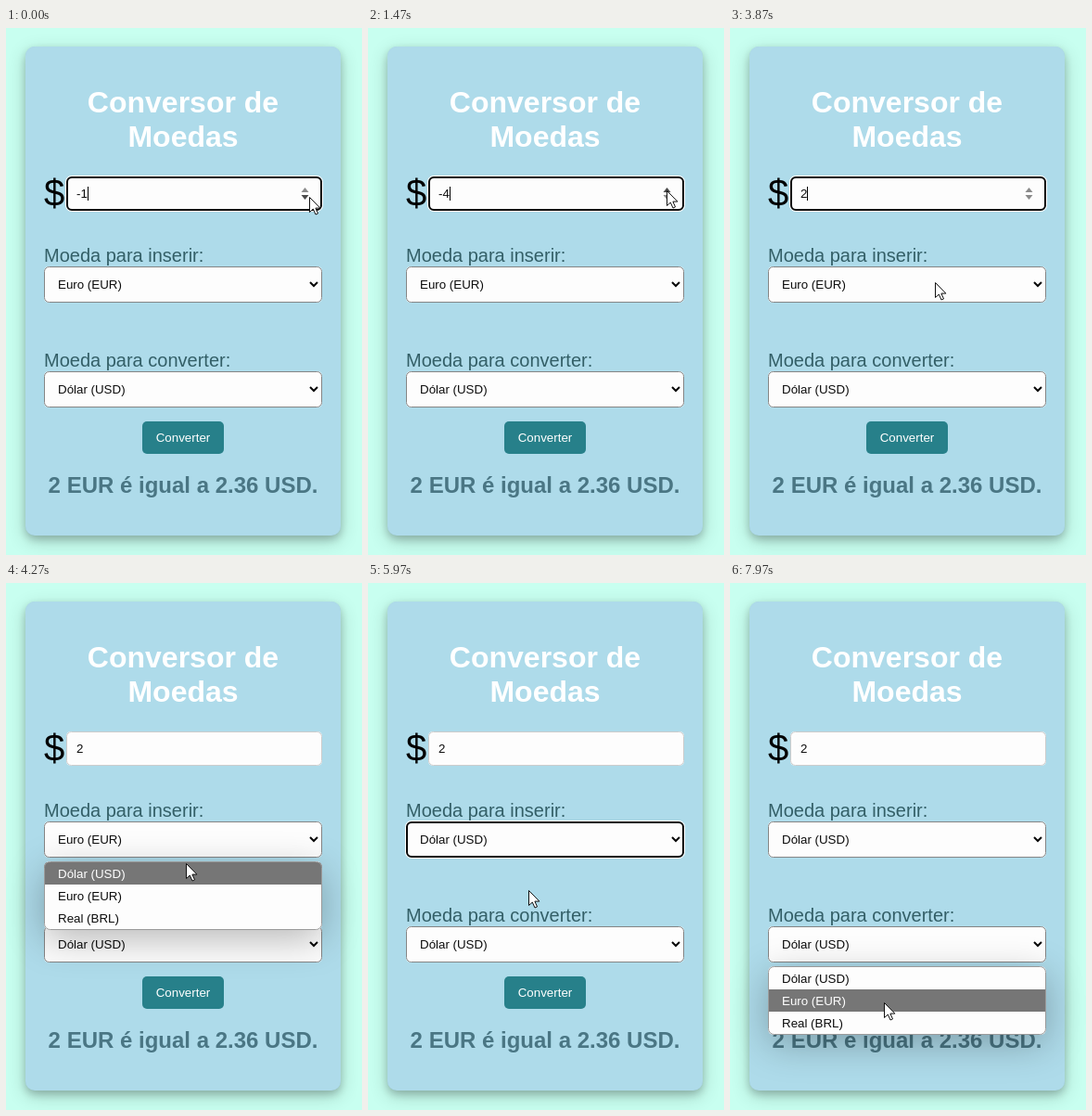
Write an HTML page with a canvas that moves like this. It is 384 by 568 pixels and loops after 8000 ms.

```html
<!DOCTYPE html>
<html lang="pt">
<head>
<meta charset="utf-8">
<title>Conversor de Moedas</title>
<style>
html, body { margin: 0; width: 100%; height: 100%; overflow: hidden; background: #c8fff0; }
canvas { display: block; width: 384px; height: 568px; }
</style>
</head>
<body>
<canvas id="stage"></canvas>
<script>
const W = 384, H = 568, LOOP = 8000;
const FONT = '"Liberation Sans", Arial, sans-serif';
const PAGE = '#c8fff0', CARD = '#aedbea', PAPER = '#fdfdfd', INK = '#0c0c0c', LABEL = '#335f67';
const OPTIONS = ['Dólar (USD)', 'Euro (EUR)', 'Real (BRL)'];
const ROW = 24, FIRST_Y = 257, SECOND_Y = 370, MENU_DROP = 43;

// Times of the clicks
const CLICK_GAP = 240, FIRST_UP = 1400;
const OPEN_FIRST = 4050, PICK_FIRST = 5500, OPEN_SECOND = 6450;

// Resting points of the pointer
const STOPS = [
  { t: 1000, x: 327, y: 182 },
  { t: 1300, x: 322, y: 175 },
  { t: 2900, x: 322, y: 175 },
  { t: 3870, x: 221, y: 274 },
  { t: 4930, x: 177, y: 320 },
  { t: 5970, x: 173, y: 331 },
  { t: 7030, x: 177, y: 395 },
  { t: 7970, x: 166, y: 452 }
];

const canvas = document.getElementById('stage');
const ctx = canvas.getContext('2d');
const dpr = window.devicePixelRatio || 1;
canvas.width = W * dpr;
canvas.height = H * dpr;
ctx.scale(dpr, dpr);

const clamp = (v, lo, hi) => Math.min(hi, Math.max(lo, v));
const easeOut = p => p * (2 - p);

function pointerAt(t) {
  const next = STOPS.findIndex(s => s.t > t);
  if (next === 0) return STOPS[0];
  if (next < 0) return STOPS[STOPS.length - 1];
  const a = STOPS[next - 1], b = STOPS[next];
  const k = easeOut((t - a.t) / (b.t - a.t));
  return { x: Math.round(a.x + (b.x - a.x) * k), y: Math.round(a.y + (b.y - a.y) * k) };
}

// Four clicks down from -1, then seven up to 2
function counterAt(t) {
  const downs = clamp(Math.floor(t / CLICK_GAP), 0, 4);
  const ups = clamp(Math.floor((t - FIRST_UP) / CLICK_GAP) + 1, 0, 7);
  const since = ups ? FIRST_UP + (ups - 1) * CLICK_GAP : downs * CLICK_GAP;
  return { value: ups - downs - 1, since };
}

function fillBox(x, y, w, h, r, color) {
  ctx.beginPath();
  ctx.roundRect(x, y, w, h, r);
  ctx.fillStyle = color;
  ctx.fill();
}

function strokeBox(x, y, w, h, r, color, width) {
  ctx.beginPath();
  ctx.roundRect(x + width / 2, y + width / 2, w - width, h - width, r);
  ctx.strokeStyle = color;
  ctx.lineWidth = width;
  ctx.stroke();
}

function shadowBox(x, y, w, h, r, color, alpha, blur, dy) {
  ctx.save();
  ctx.shadowColor = `rgba(0,0,0,${alpha})`;
  ctx.shadowBlur = blur * dpr;
  ctx.shadowOffsetY = dy * dpr;
  fillBox(x, y, w, h, r, color);
  ctx.restore();
}

function text(str, x, y, size, color, align = 'left', weight = '') {
  ctx.font = `${weight} ${size}px ${FONT}`;
  ctx.textAlign = align;
  ctx.fillStyle = color;
  ctx.fillText(str, x, y);
}

const small = (str, x, y, color = INK, align) => text(str, x, y, 13.333, color, align);

function field(x, y, w, h, focused, border) {
  if (focused) strokeBox(x - 1, y - 1, w + 2, h + 2, 6, '#ffffff', 1);
  fillBox(x, y, w, h, 5, PAPER);
  strokeBox(x, y, w, h, 5, focused ? '#080808' : border, focused ? 2 : 1);
}

function triangle(x, y, dir, color) {
  ctx.beginPath();
  ctx.moveTo(x - 4, y);
  ctx.lineTo(x + 4, y);
  ctx.lineTo(x, y - 5 * dir);
  ctx.fillStyle = color;
  ctx.fill();
}

function drawInput(t, pointer) {
  const focused = t < OPEN_FIRST;
  const { value, since } = counterAt(t);
  field(65, 160, 276, 37, focused, '#cccccc');
  small(String(value), 76, 183);
  if (!focused) return;
  if ((t - since) % 1000 < 500) {
    const width = ctx.measureText(String(value)).width;
    ctx.fillStyle = '#000';
    ctx.fillRect(Math.round(76 + width), 171, 1, 15);
  }
  const shade = hover => hover ? '#4a4a4a' : '#8a8a8a';
  triangle(322.5, 177, 1, shade(pointer.y < 179));
  triangle(322.5, 180, -1, shade(pointer.y >= 179 && pointer.y < 197));
}

function drawSelect(y, label, focused) {
  field(41, y, 300, 39, focused, '#858585');
  small(label, 56, y + 24);
  ctx.beginPath();
  ctx.moveTo(328, y + 17);
  ctx.lineTo(332, y + 21);
  ctx.lineTo(336, y + 17);
  ctx.strokeStyle = '#080808';
  ctx.lineWidth = 2;
  ctx.stroke();
}

function drawMenu(selectY, chosen, pointer) {
  const y = selectY + MENU_DROP;
  const row = Math.floor((pointer.y - y - 1) / ROW);
  const active = row in OPTIONS ? row : chosen;
  shadowBox(41, y, 300, 74, 6, PAPER, 0.28, 40, 10);
  ctx.save();
  ctx.beginPath();
  ctx.roundRect(41, y, 300, 74, 6);
  ctx.clip();
  ctx.fillStyle = '#767676';
  ctx.fillRect(41, y + 1 + active * ROW, 300, ROW);
  ctx.restore();
  strokeBox(41, y, 300, 74, 6, '#9a9a9a', 1);
  OPTIONS.forEach((name, i) => small(name, 56, y + 18 + i * ROW, i === active ? '#fff' : INK));
}

function drawPointer({ x, y }) {
  const shape = [[0, 0], [0, 16], [3.8, 12.6], [6.5, 18.5], [9, 17.4], [6.4, 11.6], [11.4, 11.6]];
  ctx.beginPath();
  shape.forEach(([dx, dy]) => ctx.lineTo(x + 0.5 + dx, y + 0.5 + dy));
  ctx.closePath();
  ctx.fillStyle = '#fff';
  ctx.fill();
  ctx.strokeStyle = '#101010';
  ctx.lineWidth = 1;
  ctx.stroke();
}

function drawCard() {
  ctx.fillStyle = PAGE;
  ctx.fillRect(0, 0, W, H);
  shadowBox(21, 20, 340, 527, 10, CARD, 0.19, 20, 6);
  shadowBox(21, 20, 340, 527, 10, CARD, 0.2, 8, 4);

  text('Conversor de', 191, 91, 32, '#fff', 'center', 'bold');
  text('Moedas', 191, 128, 32, '#fff', 'center', 'bold');
  text('$', 41, 192, 40, '#000');
  text('Moeda para inserir:', 41, 252, 20, LABEL);
  text('Moeda para converter:', 41, 365, 20, LABEL);
  fillBox(147, 424, 88, 35, 5, '#27808a');
  small('Converter', 191, 446, '#fff', 'center');
  text('2 EUR é igual a 2.36 USD.', 191, 501, 24, '#4a7684', 'center', 'bold');
}

function draw(t) {
  const pointer = pointerAt(t);
  const picked = t >= PICK_FIRST;
  const secondOpen = t >= OPEN_SECOND;

  drawCard();
  drawInput(t, pointer);
  drawSelect(FIRST_Y, OPTIONS[picked ? 0 : 1], picked && !secondOpen);
  drawSelect(SECOND_Y, OPTIONS[0], false);
  if (t >= OPEN_FIRST && !picked) drawMenu(FIRST_Y, 1, pointer);
  if (secondOpen) drawMenu(SECOND_Y, 0, pointer);
  drawPointer(pointer);
}

const start = performance.now();
function tick() {
  draw((performance.now() - start) % LOOP);
  requestAnimationFrame(tick);
}
tick();
</script>
</body>
</html>
```
